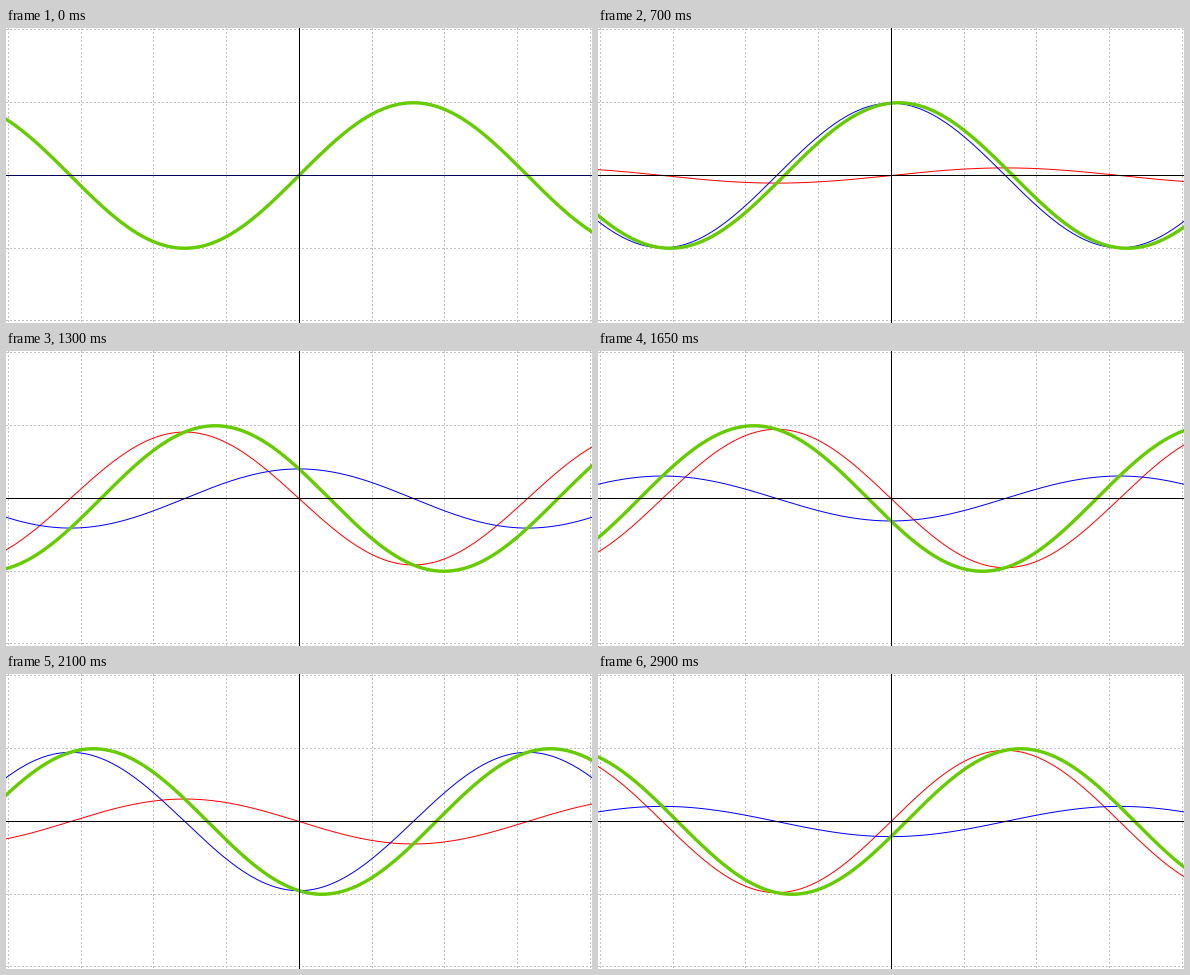
Animation, 586 px wide and 295 px high, one loop 2.95 s. Source, as a matplotlib script:

```python
import numpy as np
import matplotlib.pyplot as plt
from matplotlib.animation import FuncAnimation

W, H = 586, 295
DPI = 64
PX = 72 / DPI            # one pixel in points
CX, CY = W / 2, H / 2    # curve origin
GX, GY = 293.4, 147.3    # grid origin
UNIT = 72.75             # pixels per unit
FRAMES, INTERVAL = 59, 50
STEP = np.radians(6)     # phase gained per frame

fig = plt.figure(figsize=(W / DPI, H / DPI), dpi=DPI, facecolor="white")
ax = fig.add_axes([0, 0, 1, 1])
ax.set_xlim(0, W)
ax.set_ylim(H, 0)
ax.axis("off")


def rule(x=None, y=None, **style):
    """Full-length line filling one pixel row or column."""
    if x is not None:
        xs, ys = [int(x) + 0.5] * 2, [0, H]
    else:
        xs, ys = [0, W], [int(y) + 0.5] * 2
    # snapping would push the half-pixel centre on to the next pixel
    return ax.plot(xs, ys, lw=PX, solid_capstyle="butt",
                   dash_capstyle="butt", snap=False, **style)[0]


def curve(color, width, z):
    return ax.plot([], [], color=color, lw=width * PX, zorder=z,
                   snap=False)[0]


grid = dict(color="#c0c0c0", ls=(0, (2, 2)), zorder=1)
for k in range(-4, 5):
    if k:
        rule(x=GX + k * UNIT, **grid)
for k in (-2, -1, 1, 2):
    rule(y=GY + k * UNIT, **grid)

red = curve("#ff0000", 1, 2)
blue = curve("#0000ff", 1, 3)
green = curve("#66cc00", 3.4, 4)
x_axis = rule(y=GY, color="black", zorder=5)
rule(x=GX, color="black", zorder=5)

px = np.linspace(-4, W + 4, 600)
t = (px - CX) / UNIT


def draw(i):
    phase = i * STEP
    a, b = np.cos(phase), np.sin(phase)
    for line, value in ((red, a * np.sin(t)), (blue, b * np.cos(t)),
                        (green, np.sin(t + phase))):
        line.set_data(px, CY - UNIT * value)
    # a flat curve tints the axis it lies on
    x_axis.set_color((0.35 * (abs(a) < 1e-6), 0, 0.35 * (abs(b) < 1e-6)))
    return red, blue, green, x_axis


anim = FuncAnimation(fig, draw, frames=FRAMES, interval=INTERVAL,
                     repeat=True, repeat_delay=0)
plt.show()
```
